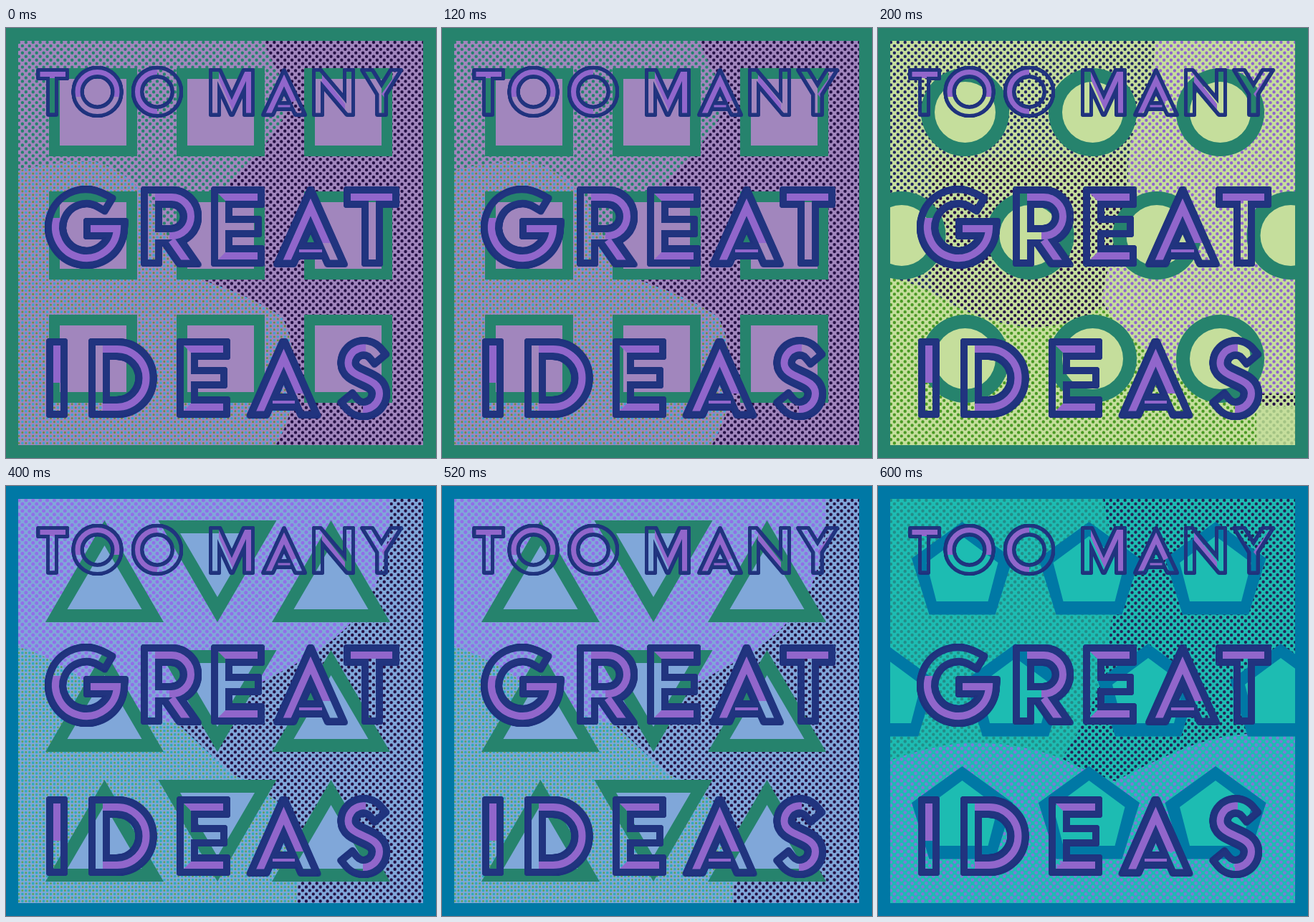
An HTML page with a canvas for the animation above (800 ms loop, 600 px wide and 600 px high).

```html
<!DOCTYPE html>
<html lang="en">
<head>
<meta charset="utf-8">
<title>Too many great ideas</title>
<style>
html, body { margin: 0; width: 100%; height: 100%; overflow: hidden; background: #26836d; }
canvas { display: block; width: 600px; height: 600px; }
</style>
</head>
<body>
<canvas id="stage" width="600" height="600" role="img" aria-label="TOO MANY GREAT IDEAS"></canvas>
<script>
const SIZE = 600, STEP = 200;
const GREEN = '#26836d', BLUE = '#0078a5', NAVY = '#21347f', PURPLE = '#9166cb', DARK = '#251045';
const ctx = document.getElementById('stage').getContext('2d');

function layer(draw) {
  const c = document.createElement('canvas');
  c.width = c.height = SIZE;
  draw(c.getContext('2d'));
  return c;
}

// Lettering: centre lines, given as [path, reaches past the line, own inner width]
const rows = [
  {
    top: 56, bottom: 123.5, inner: 7, ring: 5, round: 2,
    parts: [
      ['M51 64.5H79.5M64.5 64.5V115'],
      ['M100 89a27.5 27.5 0 1 1 55 0a27.5 27.5 0 1 1 -55 0Z', true],
      ['M183.5 89a27.5 27.5 0 1 1 55 0a27.5 27.5 0 1 1 -55 0Z', true],
      ['M291.5 135V58L315 109L338.5 58V135'],
      ['M359 135L388 73L417 135'],
      ['M381 109H395', false, 3],
      ['M435.5 135V64L478.5 115V45'],
      ['M500 52L524 91L548 52M524 91V135']
    ],
    fill: 'M45 56H86V70H45ZM92 53H163V96H92ZM211 53H174V125H211ZM297 72L320 123H350V56H325L315 100L297 60Z'
      + 'M350 124L388 56L406 100L398 104V112H376L362 124ZM441 65L473 106V118L441 82ZM524 92L550 56H560L530 100Z'
  },
  {
    top: 221, bottom: 333.5, inner: 10, ring: 10, round: 3,
    parts: [
      ['M134.1 241.1A43 43 0 1 0 155 280H123', true],
      ['M203 318V236H231A27 27 0 0 1 231 290H203M234 300L264 343'],
      ['M346 236H301V318H346M301 277H342'],
      ['M380.5 350L425 250L469.5 350'],
      ['M411 311H439', false, 4],
      ['M486 236H534M511 236V318']
    ],
    fill: 'M53 265H172V340H53ZM208 221H280V333H228V270H208ZM296 231L306 241H361V231ZM306 313L296 323H361V313Z'
      + 'M371 334L425 220L462 300H442V315H408L395 334ZM476 228H545V241H476Z'
  },
  {
    top: 433, bottom: 544.5, inner: 10, ring: 10, round: 3,
    parts: [
      ['M71 448V529'],
      ['M130 448H155A40.5 40.5 0 0 1 155 529H130Z'],
      ['M298 448H253V529H298M253 488H294'],
      ['M343 561L387.5 460L432 561'],
      ['M374 522H401', false, 4],
      ['M515.5 454A21.5 21.5 0 0 0 477.5 467.5C477.5 490 521 486 521 510A22 22 0 0 1 482 524', true]
    ],
    fill: 'M60 440H82V495H60ZM135 433H212V545H135ZM248 443L258 453H313V443ZM258 524L248 534H313V524Z'
      + 'M333 545L387 430L424 510H404V526H370L357 545ZM460 430H502V480H540V548H498V500H460Z'
  }
];

function strokeRow(g, row, extra, inset, color) {
  g.strokeStyle = color;
  g.lineCap = 'square';
  for (const [d, over, width] of row.parts) {
    const slack = over ? 8 : 0;
    g.save();
    g.beginPath();
    g.rect(0, row.top + inset - slack, SIZE, row.bottom - row.top - 2 * (inset - slack));
    g.clip();
    g.lineWidth = (width || row.inner) + extra;
    g.stroke(new Path2D(d));
    g.restore();
  }
}

function letterRow(row) {
  const r = row.round;
  const core = layer(g => strokeRow(g, row, 2 * (row.ring - r), r, NAVY));
  return layer(g => {
    // Grow the core by a small disc to round its corners
    for (let i = 0; i < 32; i++) {
      const a = i * Math.PI / 16;
      g.drawImage(core, r * Math.cos(a), r * Math.sin(a));
    }
    g.drawImage(core, 0, 0);
    g.globalCompositeOperation = 'destination-out';
    strokeRow(g, row, 0, row.ring, '#000');
    g.globalCompositeOperation = 'destination-over';
    g.clip(new Path2D(row.fill));
    strokeRow(g, row, 1, row.ring - .5, PURPLE);
  });
}

// Halftone at 45 degrees
function dots(g, color, r, shift = 0) {
  const pitch = 7 * Math.SQRT2;
  g.fillStyle = color;
  g.beginPath();
  for (let j = 0; j < 120; j++) {
    for (let i = 0; i < 62; i++) {
      const x = 13 + (i + (j % 2) / 2) * pitch + shift, y = 15 + j * pitch / 2;
      g.moveTo(x + r, y);
      g.arc(x, y, r, 0, 7);
    }
  }
  g.fill();
}

function area(g, bg, { d, dot, r = 2.2, second }) {
  g.save();
  if (d) g.clip(new Path2D(d));
  g.fillStyle = bg;
  g.fillRect(0, 0, SIZE, SIZE);
  dots(g, dot, r);
  if (second) dots(g, second, 1.6, 4.95);
  g.restore();
}

// Shapes
function poly(g, pts) {
  g.beginPath();
  pts.forEach(([x, y]) => g.lineTo(x, y));
  g.closePath();
  g.fill();
}

function ringed(g, color, bg, outline) {
  g.fillStyle = color;
  outline(false);
  g.fillStyle = bg;
  outline(true);
}

function squares(g, color, bg) {
  for (const y of [56, 228, 400]) for (const x of [60, 238, 416])
    ringed(g, color, bg, inside => inside ? g.fillRect(x + 15, y + 15, 93, 93) : g.fillRect(x, y, 123, 123));
}

function circles(g, color, bg) {
  const wide = [121.5, 299.5, 477.5], offset = [33, 212, 389, 576];
  [[117.5, wide], [289.5, offset], [461.5, wide]].forEach(([y, xs]) => xs.forEach(x =>
    ringed(g, color, bg, inside => {
      g.beginPath();
      g.arc(x, y, inside ? 42.5 : 61.5, 0, 7);
      g.fill();
    })));
}

function triangles(g, color, bg) {
  for (const top of [48, 229, 410]) [137.5, 295, 453.5].forEach((x, i) => {
    const flip = y => i === 1 ? top + 142 - y : top + y;
    ringed(g, color, bg, inside => {
      const [tip, base, half] = inside ? [35, 124, 52] : [0, 142, 82.5];
      poly(g, [[x, flip(tip)], [x + half, flip(base)], [x - half, flip(base)]]);
    });
  });
}

function pentagons(g, color, bg) {
  const wide = [117.5, 294.5, 471], offset = [10, 192, 377, 562];
  [[50, wide], [220, offset], [391, wide]].forEach(([y, xs]) => xs.forEach(x =>
    ringed(g, color, bg, inside => {
      const [tip, sx, sy, bx, by] = inside ? [20, 50, 57, 36, 111] : [0, 70.5, 51, 46, 129.5];
      poly(g, [[x, y + tip], [x + sx, y + sy], [x + bx, y + by], [x - bx, y + by], [x - sx, y + sy]]);
    })));
}

const scenes = [
  {
    edge: GREEN, bg: '#a186bd', shape: squares, ink: GREEN,
    areas: [
      { dot: GREEN },
      { d: 'M352 0Q370 50 398 95Q390 135 345 180Q310 215 285 250L285 360H600V0Z', dot: DARK },
      { d: 'M0 204Q60 185 125 187Q185 205 215 265Q235 325 275 352Q345 375 385 403Q405 440 402 500Q400 550 365 600H0Z',
        dot: '#3fa3cd', r: 1.9, second: '#6f8f45' },
      { d: 'M275 352Q345 375 385 403Q405 440 402 500Q400 550 365 600H600V350Z', dot: DARK }
    ]
  },
  {
    edge: GREEN, bg: '#c5de9c', shape: circles, ink: GREEN,
    areas: [
      { dot: '#21245f' },
      { d: 'M75 180H345V340Q320 410 240 418Q150 415 75 365Z', dot: DARK },
      { d: 'M388 0Q388 60 365 120Q345 170 350 225Q325 310 312 380Q350 440 430 490Q490 515 600 510V0Z', dot: PURPLE },
      { d: 'M0 345Q55 355 90 378Q145 412 215 418Q280 415 314 388Q350 440 430 490Q490 515 540 525V600H0Z', dot: '#4b9a25' },
      { d: 'M535 510H600V528H535Z', dot: DARK },
      { d: 'M528 528H600V600H528Z', dot: '#a3c384' }
    ]
  },
  {
    edge: BLUE, bg: '#80a7d9', shape: triangles, ink: GREEN,
    areas: [
      { dot: '#9070e8', r: 2.5 },
      { d: 'M535 0Q540 80 515 140Q485 205 410 245Q330 290 238 332V600H600V0Z', dot: DARK },
      { d: 'M0 218Q75 240 125 285Q180 320 240 332Q280 370 315 402Q380 430 405 470Q415 520 402 600H0Z',
        dot: '#2fabbd', r: 1.9, second: '#62a35f' }
    ]
  },
  {
    edge: BLUE, bg: '#1dbcb2', shape: pentagons, ink: BLUE,
    areas: [
      { dot: '#238d89' },
      { d: 'M312 0Q318 70 345 110Q325 165 322 225Q310 300 255 382L330 412L600 400V0Z', dot: '#232457' },
      { d: 'M0 390Q70 360 135 358Q215 360 270 387Q310 408 332 412Q370 390 430 365Q510 335 600 350V600H0Z',
        dot: '#7c7bd6', r: 2.4 }
    ]
  }
];

const letters = rows.map(letterRow);
const pictures = scenes.map(s => layer(g => {
  s.areas.forEach(a => area(g, s.bg, a));
  s.shape(g, s.ink, s.bg);
  g.fillStyle = s.edge;
  g.beginPath();
  g.rect(0, 0, SIZE, SIZE);
  g.rect(17, 18, 565, 564);
  g.fill('evenodd');
  letters.forEach(l => g.drawImage(l, 0, 0));
}));

const start = performance.now();
function tick(now) {
  const t = Math.max(0, now - start);
  ctx.drawImage(pictures[Math.floor(t / STEP) % pictures.length], 0, 0);
  requestAnimationFrame(tick);
}
tick(start);
</script>
</body>
</html>
```
